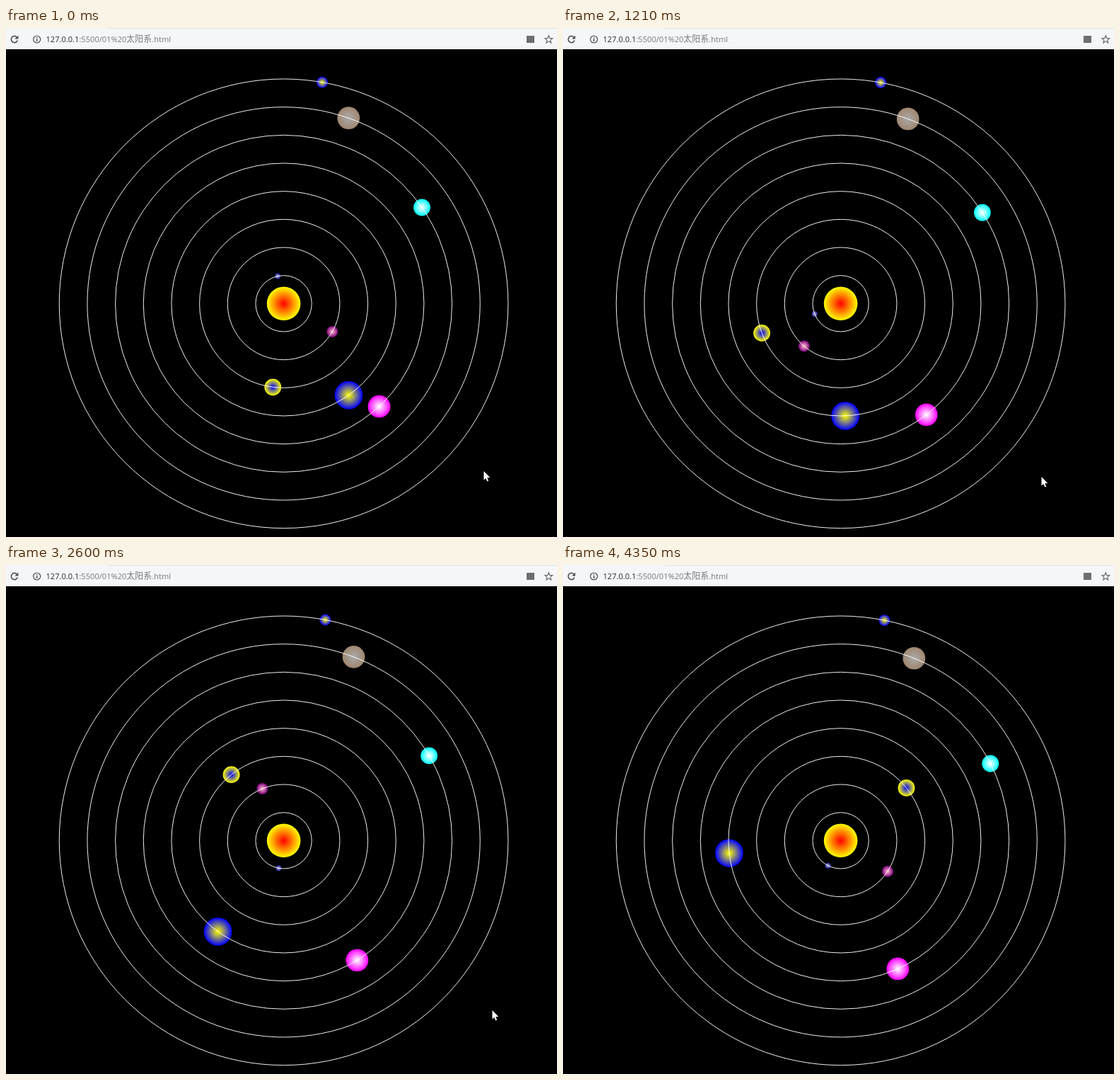
Animation, 779 px wide and 719 px high, one loop 4420 ms. Source, as an HTML page with a canvas:

```html
<!DOCTYPE html>
<html lang="zh">
<head>
<meta charset="utf-8">
<title>太阳系</title>
<style>
  html, body { margin: 0; width: 100%; height: 100%; overflow: hidden; background: #000; }
  canvas { display: block; }
</style>
</head>
<body>
<canvas id="stage" width="779" height="719"></canvas>
<script>
const ctx = document.getElementById('stage').getContext('2d');
const LOOP = 4420;
const SCALE = 0.7933;
const CENTER = { x: 392.6, y: 389.3 };
const FIRST_DAY = 1650;
const DAYS_PER_MS = 0.05203;

// The screen refreshes at a steady pace within each stretch.
const PACES = [
  { from: 0, step: 120 },
  { from: 600, step: 152 },
  { from: 1660, step: 134 },
  { from: 3170, step: 131 }
];

// The pointer rests, then wanders off.
const POINTER = [
  { t: 0, x: 675, y: 625 },
  { t: 600, x: 676, y: 633 },
  { t: 2200, x: 676, y: 633 },
  { t: 2590, x: 687, y: 628 },
  { t: 2800, x: 687, y: 628 },
  { t: 3170, x: 737, y: 683 },
  { t: 3560, x: 750, y: 706 }
];

const PLANETS = [
  { period: 87, r: 5, inner: '#bbb', outer: '#22a' },
  { period: 225, r: 10, inner: 'pink', outer: 'purple' },
  { period: 365, r: 15, inner: 'blue', outer: 'yellow' },
  { period: 687, r: 25, inner: 'yellow', outer: 'blue' },
  { period: 4332, r: 20, inner: 'white', outer: 'magenta' },
  { period: 10760, r: 15, inner: 'white', outer: 'cyan' },
  { period: 30799, r: 20, inner: '#aaa', outer: '#a08670' },
  { period: 60152, r: 10, inner: 'yellow', outer: 'blue' }
];

const orbitRadius = i => 50 * (i + 1) * SCALE;

function lastRefresh(time) {
  const { from, step } = PACES.filter(p => p.from <= time).pop();
  return from + Math.floor((time - from) / step) * step;
}

function ball(x, y, r, inner, outer) {
  const g = ctx.createRadialGradient(x, y, 0, x, y, r);
  g.addColorStop(0, inner);
  g.addColorStop(1, outer);
  ctx.fillStyle = g;
  ctx.beginPath();
  ctx.arc(x, y, r, 0, Math.PI * 2);
  ctx.fill();
}

function ring(x, y, r, from = 0, to = Math.PI * 2) {
  ctx.beginPath();
  ctx.arc(x, y, r, from, to);
  ctx.stroke();
}

function polygon(points) {
  ctx.beginPath();
  points.forEach(([x, y]) => ctx.lineTo(x, y));
  ctx.closePath();
}

function drawSystem(day) {
  ball(CENTER.x, CENTER.y, 30 * SCALE, 'red', 'yellow');
  PLANETS.forEach(({ period, r, inner, outer }, i) => {
    const angle = (day / period) * Math.PI * 2 - Math.PI / 2;
    const x = CENTER.x + orbitRadius(i) * Math.cos(angle);
    const y = CENTER.y + orbitRadius(i) * Math.sin(angle);
    ball(x, y, r * SCALE, inner, outer);
  });
  ctx.strokeStyle = 'rgba(255,255,255,0.93)';
  ctx.lineWidth = 1;
  PLANETS.forEach((_, i) => ring(CENTER.x, CENTER.y, orbitRadius(i)));
}

function drawAddress() {
  const latin = '11.1px "Open Sans", "Noto Sans", sans-serif';
  const han = '12px "Noto Sans CJK SC", "Noto Sans CJK", sans-serif';
  let x = 56.5;
  const write = (text, color, font) => {
    ctx.font = font;
    ctx.fillStyle = color;
    ctx.fillText(text, x, 20);
    x += ctx.measureText(text).width;
  };
  write('127.0.0.1', '#2b2d30', latin);
  write(':5500/01%20', '#77797c', latin);
  write('太阳系', '#77797c', han);
  write('.html', '#77797c', latin);
}

function drawStar(x, y) {
  polygon(Array.from({ length: 10 }, (_, i) => {
    const a = i * Math.PI / 5 - Math.PI / 2, r = i % 2 ? 2.5 : 5.7;
    return [x + r * Math.cos(a), y + r * Math.sin(a)];
  }));
  ctx.stroke();
}

function drawBar() {
  ctx.fillStyle = '#f5f6f7';
  ctx.fillRect(0, 0, 779, 30);
  ctx.fillStyle = '#e1e3e6';
  ctx.fillRect(144, 0, 635, 1);

  // Reload
  ctx.strokeStyle = ctx.fillStyle = '#4a4d51';
  ctx.lineWidth = 1.6;
  ring(12, 16, 4.6, 0.35, Math.PI * 1.75);
  polygon([[17.4, 10.5], [17.4, 15.4], [12.5, 15.4]]);
  ctx.fill();

  // Page info
  ctx.lineWidth = 1.2;
  ring(43.7, 16, 5);
  ctx.fillRect(43, 15, 1.4, 4);
  ctx.fillRect(43, 12.8, 1.4, 1.4);

  drawAddress();

  ctx.fillStyle = '#6b6e72';
  ctx.fillRect(736, 11, 11, 10);
  ctx.strokeStyle = '#5f6368';
  ctx.lineWidth = 1.1;
  drawStar(767.3, 16.4);
}

function drawPointer(t) {
  const i = POINTER.findIndex(p => p.t > t);
  if (i < 0) return;
  const a = POINTER[i - 1], b = POINTER[i];
  const k = (t - a.t) / (b.t - a.t);
  ctx.save();
  ctx.translate(a.x + (b.x - a.x) * k, a.y + (b.y - a.y) * k);
  polygon([[0.5, 1], [0.5, 13.5], [3.3, 11], [5.3, 15.5], [7.2, 14.7], [5.3, 10.2], [9.2, 10]]);
  ctx.fillStyle = '#fff';
  ctx.fill();
  ctx.restore();
}

const start = performance.now();

function draw(elapsed) {
  const t = lastRefresh(elapsed % LOOP);
  ctx.fillStyle = '#000';
  ctx.fillRect(0, 0, 779, 719);
  drawSystem(FIRST_DAY + Math.ceil(t * DAYS_PER_MS));
  drawBar();
  drawPointer(t);
  requestAnimationFrame(() => draw(performance.now() - start));
}

draw(0);
</script>
</body>
</html>
```
